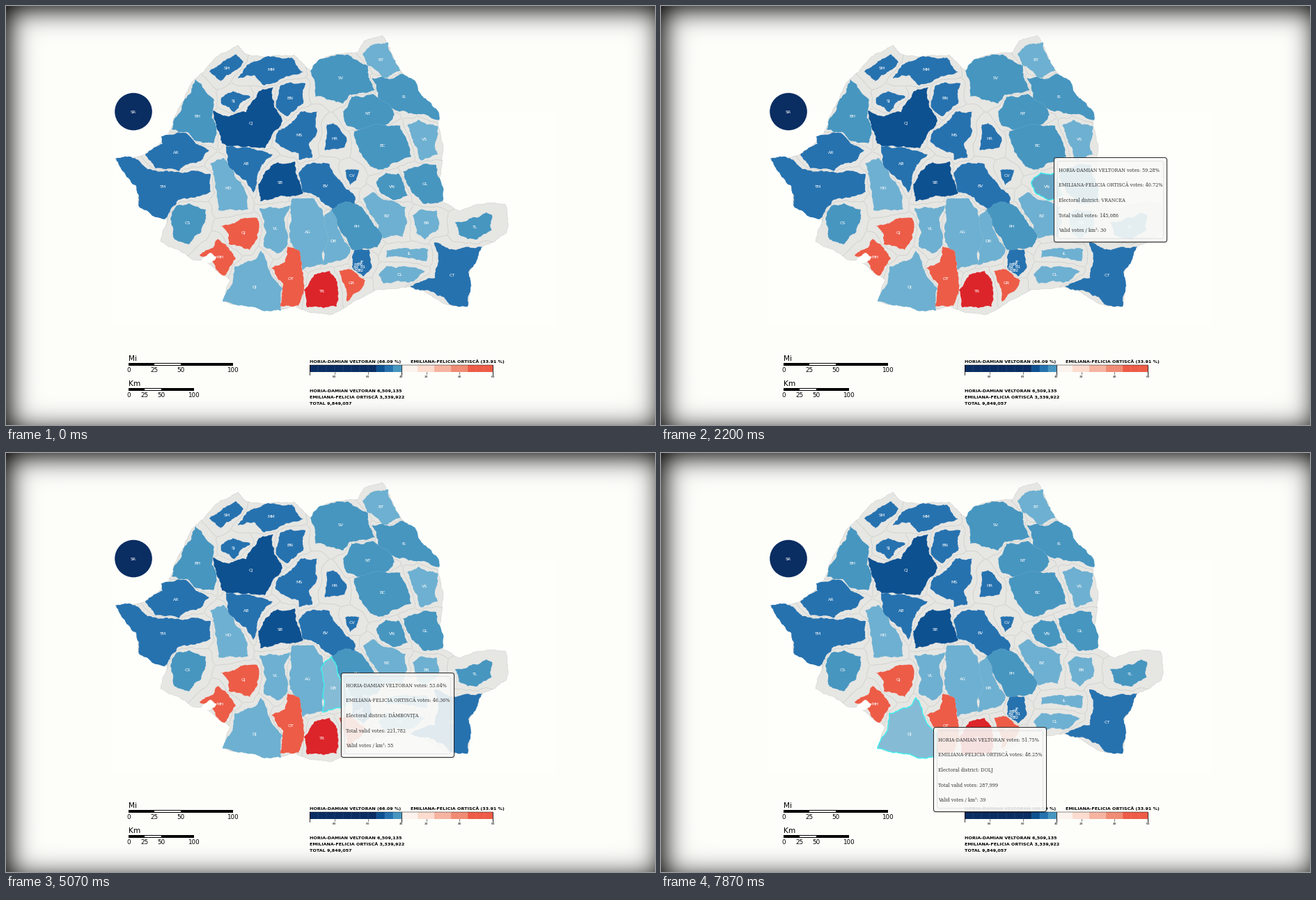
Recreate the animation shown at these times as a matplotlib script. Size 932x601 px, loop 8000 ms.

```python
import math

import matplotlib.pyplot as plt
import numpy as np
from matplotlib.animation import FuncAnimation
from matplotlib.collections import LineCollection, PolyCollection
from matplotlib.colors import to_rgb
from matplotlib.patches import Circle, FancyBboxPatch, Polygon, Rectangle

W, H, DPI = 932, 601, 64
PT = 72 / DPI  # points per pixel
FRAMES, INTERVAL = 200, 40
STEP_RATE = 15 / 1000

PAPER, LAND = "#fefffb", "#e6e6e3"
NAVY, DEEP, BLUE, MID, LIGHT = "#0a2d62", "#0d5191", "#2672af", "#4796c0", "#6eb0d1"
RED, CRIMSON, AQUA = "#ed5c47", "#dc252a", "#3cf0ee"
FIRST, SECOND = "HORIA-DAMIAN VELTORAN", "EMILIANA-FELICIA ORTISCĂ"

rng = np.random.default_rng(7)
fig = plt.figure(figsize=(W / DPI, H / DPI), dpi=DPI, facecolor=PAPER)
ax = fig.add_axes([0, 0, 1, 1], zorder=1)
ax.set_xlim(0, W)
ax.set_ylim(H, 0)
ax.set_autoscale_on(False)
ax.axis("off")


def text(x, y, s, size, color="black", font="DejaVu Sans", **kw):
    """Place text with its capitals centred on y."""
    return ax.text(x, y + 0.365 * size, s, size=size * PT, color=color,
                   family=font, va="baseline", **kw)


def rough(points, amp=0.1, depth=4):
    """Turn a plain polygon into a ragged border by midpoint displacement."""
    p = np.array(points, float)
    for _ in range(depth):
        d = np.roll(p, -1, axis=0) - p
        shift = rng.uniform(-amp, amp, len(p))[:, None]
        mid = p + d / 2 + np.column_stack([-d[:, 1], d[:, 0]]) * shift
        p = np.stack([p, mid], axis=1).reshape(-1, 2)
        amp *= 1.15
    return p


def centroid(p):
    q = np.roll(p, -1, axis=0)
    cross = p[:, 0] * q[:, 1] - q[:, 0] * p[:, 1]
    return ((p + q) * cross[:, None]).sum(axis=0) / (3 * cross.sum())


def vignette(sigma=18, offset=6):
    """Blurred inner shadow, pushed towards the lower right."""
    def ramp(n):
        t = np.arange(n) + 0.5
        edge = np.minimum(t - offset, n + offset - t) / (sigma * math.sqrt(2))
        return np.array([0.5 + 0.5 * math.erf(v) for v in edge])

    shade = np.outer(ramp(H), ramp(W))
    return shade[..., None] * np.array(to_rgb(PAPER))


fig.figimage(vignette(), origin="upper", zorder=-1)

# Country outline, clockwise from the western tip
north = [(157, 219), (186, 217), (213, 204), (234, 182), (252, 140), (272, 104),
         (291, 85), (333, 56), (345, 69), (414, 70), (437, 93), (455, 75), (506, 66),
         (514, 50), (540, 42), (566, 92), (592, 122), (621, 155)]
south = [(628, 200), (625, 235), (628, 282), (650, 294), (692, 282), (717, 284),
         (719, 325), (684, 345), (664, 385), (663, 431), (640, 430), (580, 403),
         (530, 408), (490, 430), (466, 443), (415, 430), (380, 437), (312, 424),
         (322, 394), (283, 364), (268, 364), (222, 338), (232, 307), (190, 285),
         (187, 258)]
land = Polygon(rough(north + south, 0.07), fc=LAND, ec="#aaaaaa",
               lw=0.6 * PT, ls=":", zorder=1)
ax.add_patch(land)

shapes, colors = {}, {}


def county(code, color, *corners):
    """A ragged county with its code on the centroid."""
    shapes[code], colors[code] = rough(corners), color
    x, y = centroid(shapes[code])
    text(x, y, code, 6.3, "white", ha="center", zorder=5)


county("SM", BLUE, (292, 94), (312, 79), (330, 69), (341, 80), (327, 94), (308, 108))
county("MM", BLUE, (345, 86), (372, 73), (410, 74), (427, 95), (402, 101), (371, 114),
       (358, 100), (333, 104))
county("SJ", BLUE, (309, 132), (326, 122), (351, 130), (328, 152), (310, 141))
county("BN", BLUE, (390, 130), (394, 114), (430, 111), (427, 140), (405, 158), (388, 145))
county("CJ", DEEP, (297, 150), (318, 158), (345, 152), (363, 122), (384, 117), (385, 145),
       (397, 165), (372, 204), (310, 197), (303, 177))
county("MS", BLUE, (387, 195), (391, 179), (414, 164), (424, 151), (447, 151), (447, 180),
       (435, 198), (440, 218), (421, 221), (420, 211))
county("HR", BLUE, (461, 170), (470, 168), (489, 188), (486, 203), (458, 207))
county("CV", BLUE, (487, 236), (507, 235), (503, 250), (494, 257))
county("BH", MID, (238, 177), (254, 140), (272, 105), (299, 135), (302, 185), (298, 197),
       (270, 192), (262, 182))
county("AR", BLUE, (200, 213), (225, 198), (223, 187), (258, 182), (292, 207), (280, 222),
       (248, 237), (215, 233))
county("TM", BLUE, (157, 218), (185, 218), (203, 234), (244, 238), (294, 241), (294, 266),
       (248, 278), (228, 306), (190, 285), (187, 258), (163, 230))
county("CS", MID, (236, 305), (245, 286), (262, 283), (287, 292), (280, 325), (262, 342),
       (242, 335))
county("HD", LIGHT, (293, 226), (313, 218), (340, 258), (348, 291), (305, 293), (303, 275))
county("AB", BLUE, (316, 201), (352, 204), (383, 213), (362, 240), (355, 268), (345, 250),
       (319, 228))
county("SB", DEEP, (362, 256), (372, 238), (390, 224), (415, 223), (427, 268), (395, 272),
       (365, 280))
county("BV", BLUE, (420, 240), (432, 227), (465, 227), (477, 248), (502, 276), (500, 287),
       (470, 292), (450, 275), (424, 264))
county("SV", MID, (437, 93), (448, 78), (492, 70), (520, 86), (530, 121), (494, 127),
       (484, 140), (444, 130))
county("BT", LIGHT, (512, 68), (528, 55), (549, 52), (567, 93), (540, 104), (518, 84))
county("IS", MID, (526, 103), (568, 97), (588, 108), (600, 132), (620, 150), (622, 164),
       (585, 155), (533, 142), (534, 124))
county("NT", MID, (484, 152), (496, 130), (527, 126), (558, 156), (550, 168), (505, 178),
       (490, 172))
county("BC", MID, (500, 180), (548, 172), (566, 172), (575, 190), (582, 216), (535, 235),
       (512, 216))
county("VS", LIGHT, (576, 171), (592, 163), (620, 172), (616, 198), (620, 213), (596, 222),
       (590, 203))
county("VN", MID, (532, 252), (546, 239), (563, 240), (578, 272), (555, 278), (538, 268))
county("GL", MID, (570, 237), (602, 226), (618, 228), (627, 280), (600, 284), (583, 268))
county("BZ", LIGHT, (513, 276), (526, 267), (574, 288), (570, 331), (541, 333), (535, 314))
county("BR", LIGHT, (584, 300), (594, 292), (618, 293), (621, 320), (601, 335), (589, 326))
county("TL", MID, (645, 310), (690, 296), (698, 300), (697, 322), (676, 335), (650, 328))
county("CT", BLUE, (615, 339), (646, 350), (684, 345), (664, 382), (667, 408), (663, 431),
       (640, 429), (612, 410), (580, 402), (616, 390), (620, 370))
county("IL", LIGHT, (546, 350), (572, 347), (606, 349), (604, 366), (546, 361))
county("CL", LIGHT, (535, 385), (546, 373), (602, 381), (578, 397), (542, 398))
county("IF", BLUE, (497, 360), (501, 349), (522, 350), (525, 376), (513, 388), (497, 375))
county("PH", MID, (466, 293), (490, 281), (513, 291), (540, 328), (533, 346), (498, 350),
       (480, 322))
county("DB", LIGHT, (453, 307), (467, 292), (480, 325), (495, 350), (488, 362), (455, 372),
       (456, 340))
county("AG", LIGHT, (411, 276), (442, 276), (455, 293), (456, 370), (425, 378), (420, 355),
       (407, 330))
county("VL", LIGHT, (364, 290), (408, 286), (403, 345), (390, 355), (370, 345), (374, 325))
county("GJ", RED, (308, 315), (335, 307), (361, 304), (360, 335), (350, 350), (320, 342),
       (320, 328))
county("MH", RED, (278, 358), (298, 346), (304, 334), (330, 362), (314, 387), (302, 378),
       (296, 366))
county("DJ", LIGHT, (311, 424), (326, 393), (328, 373), (357, 364), (366, 351), (376, 374),
       (397, 405), (395, 437), (355, 432))
county("OT", RED, (381, 376), (401, 367), (404, 346), (420, 350), (427, 388), (420, 430),
       (393, 430), (398, 398))
county("TR", CRIMSON, (428, 408), (442, 386), (465, 380), (476, 396), (475, 431),
       (450, 432), (432, 432))
county("GR", RED, (478, 380), (492, 377), (516, 394), (490, 424), (484, 397))

ax.add_collection(PolyCollection(list(shapes.values()), facecolors=list(colors.values()),
                                 edgecolors="#ffffff40", linewidths=0.4, zorder=2))
river_bend = [(276, 371), (286, 359), (294, 354), (303, 360), (299, 365), (284, 370)]
ax.add_patch(Polygon(rough(river_bend), fc=PAPER, zorder=3))
for n in range(6):
    text(507 + 5 * math.cos(n), 374 + 5 * math.sin(n), f"B{n + 1}", 6.3, "white",
         ha="center", zorder=5)
ax.add_patch(Circle((183, 151.5), 26.8, fc=NAVY, zorder=2))
text(183, 151.5, "SR", 6.3, "white", ha="center", zorder=5)


def county_borders(step=4):
    """Dotted lines halfway between neighbouring counties."""
    xs, ys = np.arange(150, 728, step), np.arange(36, 452, step)
    gx, gy = np.meshgrid(xs, ys)
    dist = np.array([
        np.hypot(gx[..., None] - p[::4, 0], gy[..., None] - p[::4, 1]).min(axis=-1)
        for p in shapes.values()])
    first, second = np.sort(dist, axis=0)[:2]
    segments = []
    for d in dist:
        cs = ax.contour(xs, ys, d - np.where(d == first, second, first), levels=[0])
        segments += [s for s in cs.allsegs[0] if len(s) > 1]
        cs.remove()
    lines = LineCollection(segments, colors="#b4b4b2", linewidths=0.5 * PT,
                           linestyles=":", zorder=1.5)
    ax.add_collection(lines)
    lines.set_clip_path(land)


county_borders()


def box(x0, x1, y0, y1, color):
    ax.add_patch(Rectangle((x0, y0), x1 - x0, y1 - y0, fc=color, lw=0))


def scale(name, y, end):
    span = end - 176
    text(176, y - 9, name, 10.5)
    box(175.5, end + 0.5, y - 2.2, y + 2.2, "black")
    box(176 + span / 4, 176 + span / 2, y - 1, y + 1, "white")
    for n in (0, 25, 50, 100):
        text(176 + span * n / 100, y + 8.2, str(n), 8.7, ha="center")


scale("Mi", 514, 325)
scale("Km", 550, 269)


def legend():
    left, mid, right = 436, 567.5, 699
    cell = (mid - left) / 11
    reds = ["#fdf3ee", "#fcdccf", "#f6b4a0", "#f08b74"]
    cells = [NAVY] * 8 + [DEEP, BLUE, MID] + [c for c in reds for _ in "ab"] + [RED] * 3
    for i, color in enumerate(cells):
        x = left + i * cell
        box(x, x + cell, 515, 525, color)
        ax.plot([x, x], [515, 525], color="white", alpha=0.18, lw=0.5)
    ax.plot([left, right], [515.3, 515.3], color="black", lw=0.5)
    for x in (left, mid, right):
        ax.plot([x, x], [515, 528.5], color="black", lw=0.9)
    for i, n in enumerate((80, 60, 40)):
        for x, label in ((mid - 4 * cell * (2 - i), n), (mid + 4 * cell * i + 36, 20 + 20 * i)):
            ax.plot([x, x], [525, 528], color="black", lw=0.6)
            text(x, 531.7, str(label), 4.4, ha="center")
    text(left, 510, FIRST + " (66.09 %)", 6.33, weight="bold")
    text(581, 510, SECOND + " (33.91 %)", 6.33, weight="bold")
    totals = [FIRST + " 6,509,135", SECOND + " 3,339,922", "TOTAL 9,849,057"]
    for i, s in enumerate(totals):
        text(left, 552 + 9 * i, s, 6.33, weight="bold")


legend()

# district, first share, valid votes, votes per square km
RESULTS = {
    "VS": ("VASLUI", 54.14, 154467, 30),
    "GL": ("GALAŢI", 58.02, 224163, 50),
    "VN": ("VRANCEA", 59.28, 145086, 30),
    "BZ": ("BUZĂU", 50.34, 186279, 31),
    "PH": ("PRAHOVA", 61.50, 355302, 75),
    "DB": ("DÂMBOVIŢA", 53.64, 221782, 55),
    "AG": ("ARGEŞ", 53.06, 277315, 41),
    "TR": ("TELEORMAN", 40.81, 161371, 28),
    "OT": ("OLT", 46.12, 173208, 32),
    "DJ": ("DOLJ", 51.75, 287999, 39),
}

# county, first step, steps until the pointer rests, step it leaves, tooltip corner
VISITS = [
    ("VS", 12, 3, 26, (620, 167)), ("GL", 28, 0, 31, (584, 200)),
    ("VN", 31, 2, 44, (564, 217)), ("BZ", 45, 3, 60, (540, 260)),
    ("PH", 61, 0, 76, (518, 290)), ("DB", 76, 0, 88, (481, 315)),
    ("AG", 89, 0, 100, (460, 335)), ("TR", 101, 2, 113, (446, 368)),
    ("OT", 114, 1, 116, (425, 392)), ("DJ", 116, 2, 120, (391, 393)),
]
DRIFT = 6  # how far the tooltip slides while the pointer settles

hover = Polygon([(0, 0), (1, 0), (0, 1)], ec=AQUA, lw=1.4 * PT, zorder=4)
ax.add_patch(hover)


def panel(inset, drop, alpha, **kw):
    """One layer of the tooltip, with its offset and full opacity."""
    patch = FancyBboxPatch((0, 0), 163 - 2 * inset, 122 - 2 * inset, zorder=10,
                           boxstyle="round,pad=0,rounding_size=3.5", **kw)
    ax.add_patch(patch)
    return patch, inset, inset + drop, alpha


panels = [
    panel(-1, 1, 0.05, fc="black", lw=0),
    panel(0, 1, 0.07, fc="black", lw=0),
    panel(0.5, 0, 0.87, fc="#fefffd", lw=0),
    panel(0.5, 0, 1, fc="none", ec="#2a2a2a", lw=PT),
    panel(5.5, 0, 1, fc="none", ec="#dcdcdc", lw=0.8 * PT),
]
lines = [text(0, 0, "", 6.5, "#333333", "DejaVu Serif", zorder=11) for _ in range(5)]
tip = [p[0] for p in panels] + lines


def tooltip_lines(code):
    name, share, votes, density = RESULTS[code]
    return [f"{FIRST} votes: {share:.2f}%", f"{SECOND} votes: {100 - share:.2f}%",
            f"Electoral district: {name}", f"Total valid votes: {votes:,}",
            f"Valid votes / km²: {density}"]


def update(i):
    step = int((i * INTERVAL + 35) * STEP_RATE)
    past = [v for v in VISITS if v[1] <= step]
    for artist in tip + [hover]:
        artist.set_visible(bool(past))
    if not past:
        return tip + [hover]

    code, enter, glide, leave, corner = past[-1]
    fade = min(1, (step - VISITS[0][1] + 1) / 4)
    unsettled = max(0, 1 - (step - enter) / glide) if glide else 0
    slide = DRIFT * unsettled if len(past) > 1 else 0
    x, y = corner[0] + slide, corner[1] + slide

    hover.set_visible(step < leave)
    hover.set_xy(shapes[code])
    hover.set_facecolor(0.8 * np.array(to_rgb(colors[code])) + 0.2 * np.array(to_rgb(LAND)))
    for patch, dx, dy, alpha in panels:
        patch.set_x(x + dx)
        patch.set_y(y + dy)
        patch.set_alpha(alpha * fade)
    for n, (line, s) in enumerate(zip(lines, tooltip_lines(code))):
        line.set_position((x + 7, y + 20.9 + 21.5 * n))
        line.set_text(s)
        line.set_alpha(fade)
    return tip + [hover]


anim = FuncAnimation(fig, update, frames=FRAMES, interval=INTERVAL, repeat=True,
                     repeat_delay=0, blit=False)
plt.show()
```
